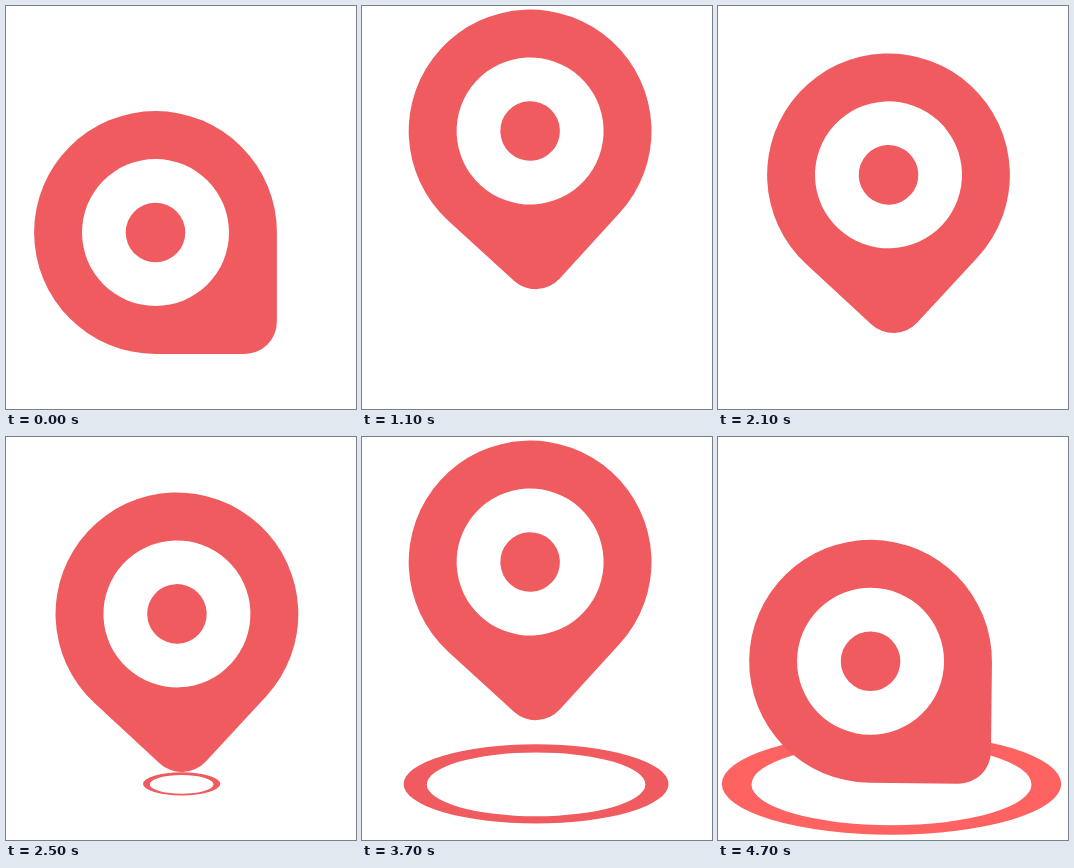
These frames come from a looping animation (350x403 px, 4.8 s). An HTML page:

```html
<!DOCTYPE html>
<html lang="en">
<head>
<meta charset="utf-8">
<title>Bouncing map pin</title>
<style>
html, body { margin: 0; width: 100%; height: 100%; overflow: hidden; background: #fff; }
svg { display: block; }
</style>
</head>
<body>
<svg width="350" height="403" viewBox="0 0 350 403">
  <path id="ring" fill-rule="evenodd"/>
  <g id="pin" fill="#ef5b5f">
    <path d="M0 121.4A121.4 121.4 0 1 1 121.4 0V89A32.4 32.4 0 0 1 89 121.4Z"/>
    <circle r="73.5" fill="#fff"/>
    <circle r="29.8"/>
  </g>
</svg>
<script>
const LOOP = 4800, STEP = 100;
const pin = document.getElementById('pin');
const ring = document.getElementById('ring');

// Cosine ease from 0 to 1 between two times
const ease = (t, from, to) => {
  const u = Math.min(1, Math.max(0, (t - from) / (to - from)));
  return (1 - Math.cos(Math.PI * u)) / 2;
};

const ellipse = (cx, cy, rx, ry) =>
  `M${cx - rx} ${cy}a${rx} ${ry} 0 1 0 ${2 * rx} 0a${rx} ${ry} 0 1 0 ${-2 * rx} 0Z`;

function drawPin(t) {
  const rising = t < LOOP / 2;
  const lift = rising ? ease(t, 0, 1074) : 1 - ease(t, 3750, 4800);
  const dip = rising ? ease(t, 1300, 2400) : 1 - ease(t, 2400, 3490);
  const restX = rising ? 149.5 : 152.7;
  const x = restX - 6.8 * lift + (174.9 - restX) * lift * lift + 2.9 * dip;
  const y = 226.5 - 101.5 * lift + 53 * dip;
  const angle = 42.4 * lift * (0.67 + 0.33 * lift) + 0.4 * dip;
  pin.setAttribute('transform', `translate(${x} ${y}) rotate(${angle})`);
}

function drawRing(t) {
  if (t < LOOP / 2) return ring.setAttribute('d', '');
  const rx = 37.8 + 131.9 * ease(t, 2400, 4420);
  const cx = 176.3 - 0.0166 * rx;
  const ry = rx * 0.299;
  const glow = ease(t, 3700, 4700);
  ring.setAttribute('d', ellipse(cx, 346.9, rx, ry) + ellipse(cx, 347.4, rx * 0.825, ry * 0.805));
  ring.setAttribute('fill', `rgb(${239 + 16 * glow},${91 + 8 * glow},${95 + 2 * glow})`);
}

function frame() {
  const t = Math.floor(performance.now() % LOOP / STEP) * STEP;
  drawPin(t);
  drawRing(t);
  requestAnimationFrame(frame);
}
frame();
</script>
</body>
</html>
```
